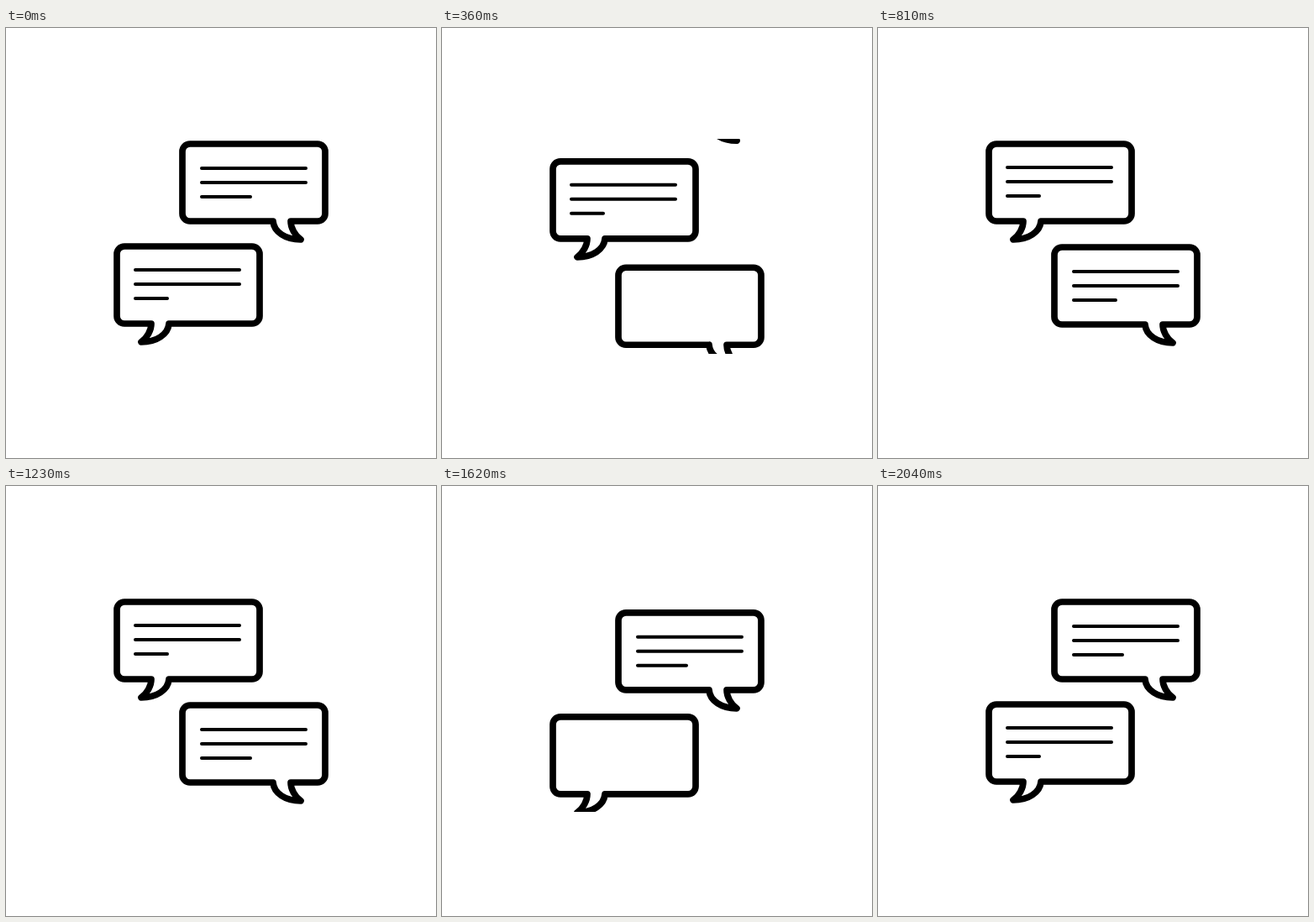
Animation, 512 px wide and 512 px high, one loop 2430 ms. Source, as an HTML page with a canvas:

```html
<!DOCTYPE html>
<html lang="en">
<head>
<meta charset="utf-8">
<title>Chat bubbles</title>
<style>
  html, body { margin: 0; height: 100%; overflow: hidden; background: #fff; }
  canvas { display: block; width: 100vw; height: 100vh; }
</style>
</head>
<body>
<canvas width="512" height="512"></canvas>
<script>
const ctx = document.querySelector('canvas').getContext('2d');
const LOOP = 2430, STEP = 30, LINE_TIME = 130;
const clamp = v => Math.min(1, Math.max(0, v));

// Bubble with its tail at the right, top edge at y = 0
const rightShape = new Path2D(
  'M318 92H219A9 9 0 0 1 210 83V9A9 9 0 0 1 219 0H371A9 9 0 0 1 380 9V83' +
  'A9 9 0 0 1 371 92H339C339 100 344 109 351 114C333 114 319 105 318 92Z');
// Leave the tail's mouth open
const rightOutline = new Path2D(
  'M318 92H219A9 9 0 0 1 210 83V9A9 9 0 0 1 219 0H371A9 9 0 0 1 380 9V83' +
  'A9 9 0 0 1 371 92H339C339 100 344 109 351 114C333 114 319 105 318 92');
const leftOutline = new Path2D();
leftOutline.addPath(rightOutline, new DOMMatrix([-1, 0, 0, 1, 512, 0]));

const RIGHT = { outline: rightOutline, x: 233, y: 29, widths: [124, 124, 58] };
const LEFT = { outline: leftOutline, x: 154, y: 28, widths: [124, 124, 38] };

// Symmetric cubic-bezier(.6, 0, .4, 1), solved by bisection
function ease(x) {
  if (x <= 0 || x >= 1) return clamp(x);
  let lo = 0, hi = 1;
  for (let i = 0; i < 30; i++) {
    const s = (lo + hi) / 2, r = 1 - s;
    if (1.8 * s * r * r + 1.2 * s * s * r + s * s * s < x) lo = s; else hi = s;
  }
  return lo * lo * (3 - 2 * lo);
}

function bubble(kind, top, typed = 3) {
  ctx.save();
  ctx.translate(0, top);
  ctx.lineWidth = 7.7;
  ctx.stroke(kind.outline);
  ctx.lineWidth = 4;
  kind.widths.forEach((width, i) => {
    const part = clamp(typed - i);
    if (!part) return;
    const y = kind.y + 17 * i;
    ctx.beginPath();
    ctx.moveTo(kind.x, y);
    ctx.lineTo(kind.x + width * part, y);
    ctx.stroke();
  });
  ctx.restore();
}

function draw(now) {
  const t = Math.floor(now % LOOP / STEP) * STEP;
  const a = ease((t - 7.5) / 531);
  const b = ease((t - 1225.5) / 546);
  ctx.fillStyle = '#fff';
  ctx.fillRect(0, 0, 512, 512);
  ctx.save();
  ctx.beginPath();
  ctx.rect(128, 132, 256, 256);
  ctx.clip();
  ctx.strokeStyle = '#000';
  ctx.lineCap = ctx.lineJoin = 'round';
  bubble(RIGHT, 138 - 142 * a);
  bubble(LEFT, 260 - 122 * a - 142 * b);
  bubble(RIGHT, 403 - 142 * a - 123 * b, (t - 438) / LINE_TIME);
  bubble(LEFT, 402 - 142 * b, (t - 1648) / LINE_TIME);
  ctx.restore();
}

const start = performance.now();
function tick() {
  draw(performance.now() - start);
  requestAnimationFrame(tick);
}
tick();
</script>
</body>
</html>
```
